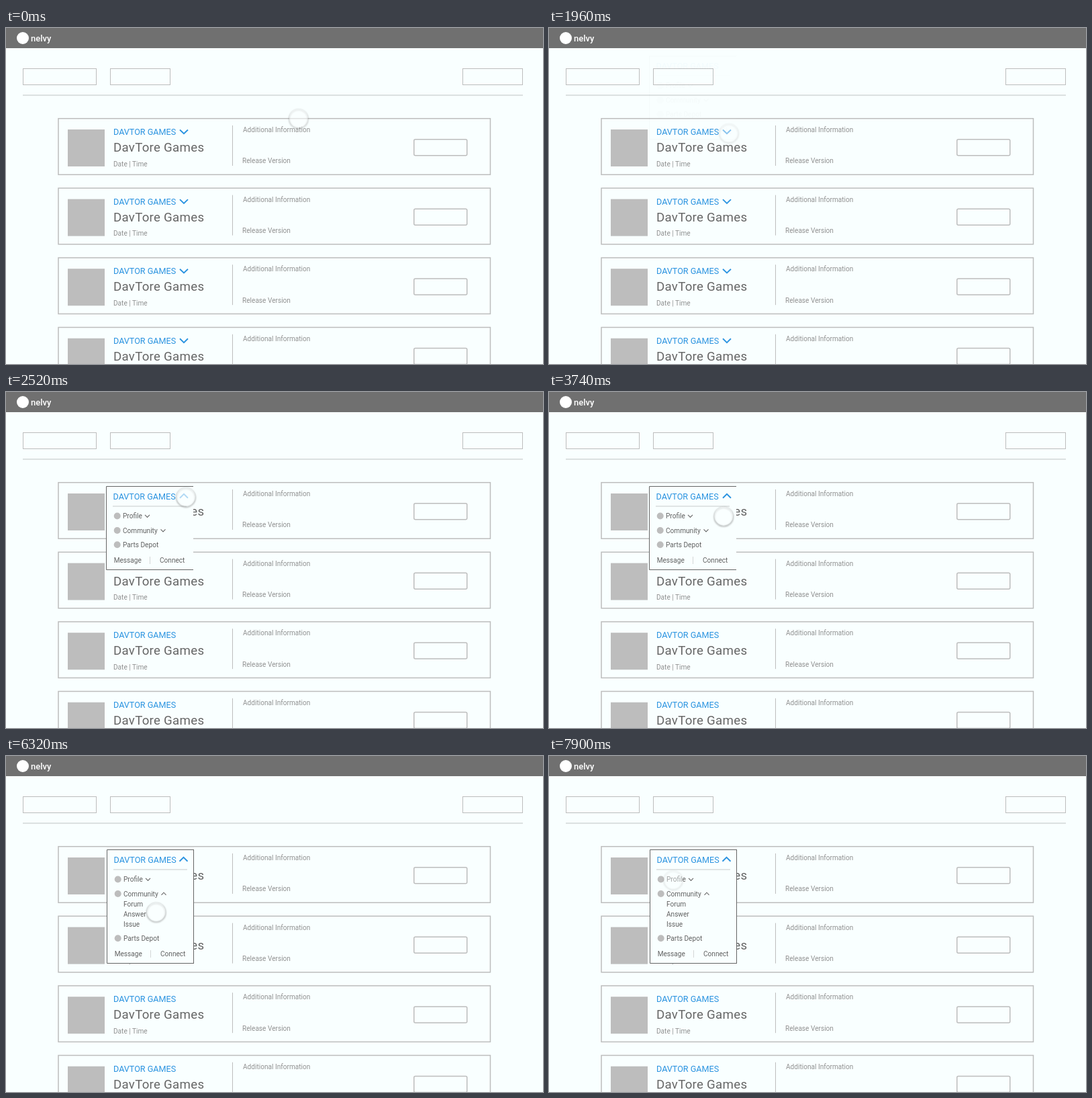
An HTML page for the animation above (8000 ms loop, 800 px wide and 500 px high).

```html
<!DOCTYPE html>
<html lang="en">
<head>
<meta charset="utf-8">
<title>Card menu</title>
<style>
  html, body { margin: 0; width: 100%; height: 100%; overflow: hidden; background: #f9ffff; }
  svg { display: block; width: 800px; height: 500px; font-family: Roboto, sans-serif; font-size: 10.1px; }
  .brand { font-size: 13px; font-weight: 500; fill: #fff; }
  .studio { font-size: 12.6px; fill: #2a93e0; }
  .title { font-size: 18.7px; letter-spacing: .27px; fill: #666; }
  .note { fill: #919191; }
  .item { fill: #616161; }
  .box { fill: none; stroke: #bdbdbd; }
  .gray { fill: #bdbdbd; }
  .edge { fill: none; stroke: #666; }
  .arrow { fill: none; stroke: #2a93e0; stroke-width: 1.9; }
  .small { fill: none; stroke: #666; stroke-width: 1.1; }
</style>
</head>
<body>
<svg id="stage" viewBox="0 0 800 500"></svg>
<script>
const PERIOD = 8000;
const CARD_STEP = 103.6;
const STUDIO = 'DAVTOR GAMES';

const text = (cls, x, y, s) => `<text class="${cls}" x="${x}" y="${y}">${s}</text>`;
const rect = (x, y, w, h, extra = 'class="box"') =>
  `<rect x="${x}" y="${y}" width="${w}" height="${h}" ${extra}/>`;
const line = (x1, y1, x2, y2, color, width = 1) =>
  `<path d="M${x1} ${y1}L${x2} ${y2}" stroke="${color}" stroke-width="${width}"/>`;
// A positive h points down, a negative one up.
const chevron = (cls, x, y, w, h, id = '') =>
  `<path class="${cls}" ${id && `id="${id}"`} d="M${x - w} ${y - h}L${x} ${y + h}L${x + w} ${y - h}"/>`;
const dot = y => `<circle class="gray" cx="165.7" cy="${y}" r="5"/>`;

function card(i) {
  return `<g transform="translate(0 ${i * CARD_STEP})">
    ${rect(78, 134.7, 643.5, 83.5, 'class="box" stroke-width="1.5"')}
    ${rect(92, 151, 55, 55, 'class="gray"')}
    ${text('studio', 160, 159, STUDIO)}
    ${chevron('arrow down', 265, 154.4, 6, 2.9)}
    ${text('title', 160, 184, 'DavTore Games')}
    ${text('note', 160, 205.7, 'Date | Time')}
    ${line(337.5, 145, 337.5, 205, '#bdbdbd')}
    ${text('note', 353, 155.3, 'Additional Information')}
    ${text('note', 352, 201.4, 'Release Version')}
    ${rect(607.8, 165.7, 79, 24, 'class="box" stroke-width="1.5" rx="2"')}
  </g>`;
}

const header = `${rect(0, 0, 800, 30, 'fill="#707070"')}
  <circle cx="25" cy="15" r="9" fill="#fff"/>
  ${text('brand', 37, 19.5, 'nelvy')}
  ${rect(25.5, 60.5, 109, 24)}${rect(155.5, 60.5, 89, 24)}${rect(680.5, 60.5, 89, 24)}
  ${line(25, 100, 770, 100, '#d3d7d7', 1.6)}`;

const menu = `<g id="menu">
  ${rect(149, 140, 130, 125, 'id="panel" fill="#f9ffff"')}
  <path id="frame" class="edge"/><path id="side" class="edge"/>
  ${text('studio', 159.5, 160, STUDIO)}
  ${line(159, 170, 269, 170, '#d9dddd', 1.6)}
  ${dot(184.5)}${text('item', 174, 188, 'Profile')}${chevron('small', 210.5, 184.7, 3.5, 1.8)}
  ${dot(206)}${text('item', 174, 209.5, 'Community')}
  ${chevron('small', 234, 206.2, 3.5, 1.8, 'closed')}${chevron('small', 234, 206, 3.5, -1.8, 'opened')}
  <g id="links">${['Forum', 'Answer', 'Issue'].map((s, i) => text('item', 174, 225 + 15 * i, s)).join('')}</g>
  <g id="lower">
    ${dot(227.2)}${text('item', 174, 231, 'Parts Depot')}
    ${text('item', 160.7, 254, 'Message')}
    ${line(214.5, 245, 214.5, 256, '#d3d7d7')}
    ${text('item', 229, 254, 'Connect')}
  </g>
</g>`;

const cursor = `<g id="cursor">
  <circle id="shadow" cy="1.3" r="13.8" fill="none" stroke="#777" stroke-width="1.6" filter="url(#blur)"/>
  <circle id="disc" r="13.8" fill="#fbffff"/>
</g>`;

document.getElementById('stage').innerHTML =
  `<defs><filter id="blur" x="-30%" y="-30%" width="160%" height="160%"><feGaussianBlur stdDeviation="1.1"/></filter></defs>
  ${rect(0, 0, 800, 500, 'fill="#f9ffff"')}${header}${[0, 1, 2, 3].map(card).join('')}
  ${menu}${chevron('arrow', 265, 154.8, 6, -2.9, 'up')}${cursor}`;

const el = {};
document.querySelectorAll('[id]').forEach(n => { el[n.id] = n; });
const downArrows = document.querySelectorAll('.down');

const part = (t, a, b) => Math.min(1, Math.max(0, (t - a) / (b - a)));
const mix = (a, b, u) => a + (b - a) * u;
const inOut = u => (1 - Math.cos(Math.PI * u)) / 2;

// Cubic curve (.25, .1, .25, 1), solved by bisection.
function ease(x) {
  if (x <= 0 || x >= 1) return x;
  const cubic = (a, b, u) => 3 * a * u * (1 - u) ** 2 + 3 * b * u * u * (1 - u) + u ** 3;
  let lo = 0, hi = 1;
  for (let i = 0; i < 24; i++) {
    const mid = (lo + hi) / 2;
    if (cubic(.25, .25, mid) < x) lo = mid; else hi = mid;
  }
  return cubic(.1, 1, lo);
}

// start, end, target, bend point, easing
const moves = [
  [0, 320, [268, 156], [345, 152], u => 1 - (1 - u) ** 2],
  [3380, 4190, [237, 207], [267.5, 188.5], u => inOut(u ** .87)],
  [5900, 6700, [212, 253], [225, 230], inOut],
  [6720, 7530, [185, 184], [198, 219], inOut]
];
// start, end, strength of the disc and its shadow
const shades = [
  [0, 320, 1], [840, 1580, .35], [1960, 2260, 1], [4200, 4520, .35],
  [4840, 5200, 1], [7540, 7900, .35]
];

function cursorAt(t) {
  let p = [437, 134];
  for (const [a, b, end, bend, curve] of moves) {
    if (t < a) break;
    const u = curve(part(t, a, b));
    p = p.map((v, i) => mix(mix(v, bend[i], u), mix(bend[i], end[i], u), u));
  }
  return p;
}

const shadeAt = t => shades.reduce((s, [a, b, v]) => mix(s, v, part(t, a, b)), .7);

function draw(t) {
  const open = ease(part(t, 1940, 2500));
  const grow = ease(part(t, 4840, 5200));
  const shade = shadeAt(t);
  const move = (node, x, y) => node.setAttribute('transform', `translate(${x} ${y})`);
  const fade = (node, v) => node.setAttribute('opacity', v);

  downArrows.forEach(n => fade(n, 1 - open));
  fade(el.menu, open);
  move(el.menu, grow, -101 * (1 - open) - grow);
  fade(el.up, open);
  move(el.up, -.5 * grow, -grow);

  // The panel is open on its right side until it grows.
  const bottom = 264.5 + 45 * grow;
  el.panel.setAttribute('height', 125 + 45 * grow);
  el.frame.setAttribute('d', `M279 140.5H149.5V${bottom}H279`);
  el.side.setAttribute('d', `M278.5 141V${bottom - .5}`);
  fade(el.side, grow);
  move(el.lower, 0, 45 * grow);
  fade(el.links, grow);
  fade(el.closed, 1 - grow);
  fade(el.opened, grow);

  move(el.cursor, ...cursorAt(t));
  fade(el.shadow, .65 * shade);
  fade(el.disc, .3 + .35 * shade);
}

const start = performance.now();
function tick() {
  draw((performance.now() - start) % PERIOD);
  requestAnimationFrame(tick);
}
tick();
</script>
</body>
</html>
```
